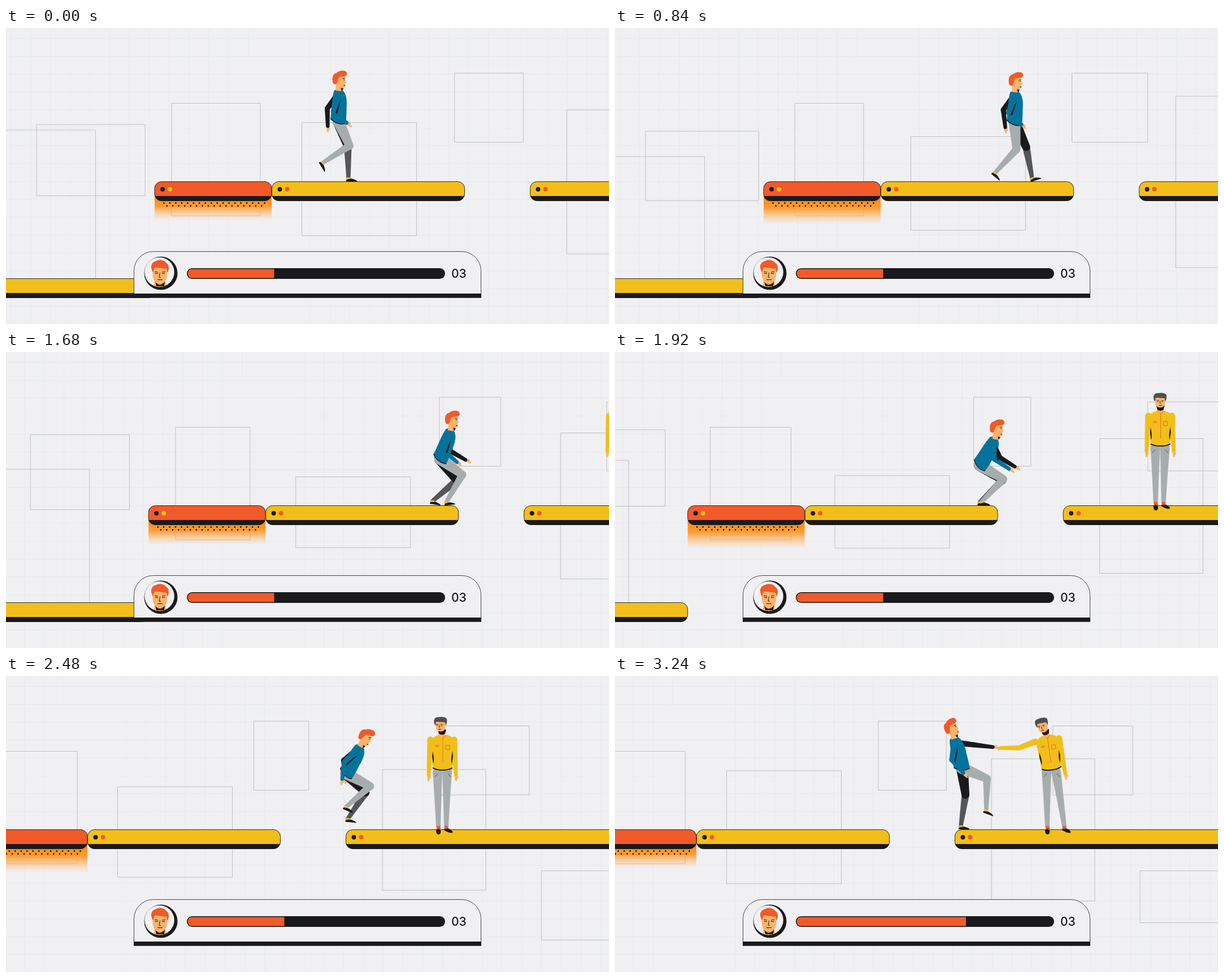
Animation, 1067 px wide and 525 px high, one loop 3280 ms. Source, as an HTML page with a canvas:

```html
<!DOCTYPE html>
<html lang="en">
<head>
<meta charset="utf-8">
<title>Platform walk</title>
<style>
html, body { margin: 0; width: 100%; height: 100%; overflow: hidden; background: #f0f0f2; }
canvas { display: block; }
</style>
</head>
<body>
<canvas id="stage" width="1067" height="525"></canvas>
<script>
const ctx = document.getElementById('stage').getContext('2d');
const LOOP = 3280, STEP = 520, STRIDE = 132;
const BG = '#f0f0f2', INK = '#1a1a1c', RED = '#f15a29', YELLOW = '#f2be1a', BLUE = '#04739c';
const GREY = '#a7adad', DARK = '#555658', SKIN = '#fbb36b', HAIR = '#4d4f50';

// Timing
const part = (t, a, b) => Math.min(1, Math.max(0, (t - a) / (b - a)));
const ramp = (t, a, b) => {
  const u = part(t, a, b);
  return u * u * (3 - 2 * u);
};
const mix = (a, b, u) => a + (b - a) * u;
const wave = (t, mid, size, peak, period = LOOP) =>
  mid + size * Math.cos((t - peak) * 2 * Math.PI / period);

// Drawing
function fill(d, color) {
  ctx.fillStyle = color;
  ctx.fill(new Path2D(d));
}
function line(d, color, width) {
  ctx.strokeStyle = color;
  ctx.lineWidth = width;
  ctx.stroke(new Path2D(d));
}
function outline(color, width) {
  ctx.strokeStyle = color;
  ctx.lineWidth = width;
  ctx.stroke();
}
function disc(x, y, r, color) {
  ctx.beginPath();
  ctx.arc(x, y, r, 0, 7);
  ctx.fillStyle = color;
  ctx.fill();
}
function box(x, y, w, h, r, color) {
  ctx.beginPath();
  ctx.roundRect(x, y, w, h, r);
  ctx.fillStyle = color;
  ctx.fill();
}
function at([x, y], angle, draw) {
  ctx.save();
  ctx.translate(x, y);
  ctx.rotate(angle);
  draw();
  ctx.restore();
}
const offset = ([x, y], dx, dy, angle = 0) => {
  const c = Math.cos(angle), s = Math.sin(angle);
  return [x + dx * c - dy * s, y + dx * s + dy * c];
};
const heading = (a, b) => Math.atan2(b[1] - a[1], b[0] - a[0]);

function taper(a, b, ra, rb, color) {
  const dir = heading(a, b), q = Math.PI / 2;
  ctx.beginPath();
  ctx.arc(a[0], a[1], ra, dir + q, dir + 3 * q);
  ctx.arc(b[0], b[1], rb, dir - q, dir + q);
  ctx.fillStyle = color;
  ctx.fill();
}
// Middle joint of a two-part limb
function bend(a, b, upper, lower, side) {
  const d = Math.hypot(b[0] - a[0], b[1] - a[1]);
  const along = (upper * upper - lower * lower + d * d) / (2 * d);
  const out = Math.sqrt(Math.max(0, upper * upper - along * along));
  return offset(a, along, -side * out, heading(a, b));
}
function arm(shoulder, reach, side, r, color) {
  const wrist = offset(shoulder, ...reach), elbow = bend(shoulder, wrist, 31, 31, side);
  const dir = heading(elbow, wrist);
  taper(wrist, offset(wrist, 10, 0, dir), 3, 1.5, SKIN);
  taper(wrist, offset(wrist, 6, -3, dir), 2, 1.2, SKIN);
  taper(shoulder, elbow, r, r - 1, color);
  taper(elbow, wrist, r - 1, r - 2.2, color);
  return elbow;
}
function leg(hip, [x, y, turn], thigh, shin) {
  const ankle = [x, y], knee = bend(hip, ankle, 48, 56, 1);
  taper(knee, ankle, 6.8, 3.6, shin);
  taper(hip, knee, 10.5, 7, thigh);
  at(ankle, turn, () => {
    fill('M-3 -1H3L5 4H-3Z', YELLOW);
    fill('M-4 3L0 2L5 1C9 2 13 3 15 5V6H-4Z', INK);
  });
}

// Walker poses. hip: x, y, lean, head tilt; feet: x, y, shoe angle; hands: from the shoulder
const CROUCH = {
  hip: [780, 201, .52, .05], near: [783, 266, 0], far: [780, 266, 0], nearHand: [30, 48], farHand: [40, 44]
};
const AIR = {
  hip: [928, 173, .48, .45], near: [928, 232, .4], far: [931, 253, .1], nearHand: [-27, 52], farHand: [-22, 50]
};
const LAND = { ...AIR, hip: [934, 188, .4, .4], near: [945, 266, 0], far: [938, 266, 0] };
const CATCH = {
  hip: [940, 163, -.25, -.35], near: [983, 238, .35], far: [938, 266, 0], nearHand: [16, 54], farHand: [68, 8]
};

function footstep(t) {
  const cycle = (t - STEP / 2) / (2 * STEP), n = Math.floor(cycle);
  const u = Math.min(1, (cycle - n) * 1.9);
  const relax = 1 - ramp(cycle - n, .54, .62);
  return [
    606 + STRIDE * (n + u ** 2.5),
    266 - 27 * Math.sin(Math.PI * u),
    1.7 * (1 - .75 * u) * Math.sin(1.3 * Math.PI * u) * relax
  ];
}
function walk(t) {
  const swing = wave(t, 0, 19, -80, 2 * STEP);
  const [x, y, turn] = footstep(t - STEP);
  return {
    hip: [588 + .1415 * t, wave(t, 166.5, -1.5, 0, STEP), .02, 0],
    near: [x + STRIDE / 2, y, turn],
    far: footstep(t),
    nearHand: [swing - 1, 53 - swing / 6],
    farHand: [-swing - 1, 53 + swing / 6]
  };
}
function blend(a, b, u) {
  const pose = {};
  for (const key in a) pose[key] = a[key].map((v, i) => mix(v, b[key][i], u));
  return pose;
}
function poseAt(t) {
  let pose = walk(Math.min(t, 1340));
  pose = blend(pose, CROUCH, ramp(t, 1340, 1900));
  pose = blend(pose, AIR, part(t, 2040, 2480));
  pose = blend(pose, LAND, ramp(t, 2480, 2600));
  pose = blend(pose, CATCH, ramp(t, 2620, 3000));
  const hop = 64 * Math.sin(Math.PI * part(t, 2040, 2480));
  for (const key of ['hip', 'near', 'far']) pose[key][1] -= hop;
  return pose;
}

function walker(t) {
  const { hip: [x, y, lean, tilt], near, far, nearHand, farHand } = poseAt(t);
  const hip = [x, y], shoulder = offset(hip, -2, -47, lean);
  arm(shoulder, farHand, -1, 5.5, INK);
  leg(hip, far, INK, DARK);
  leg(hip, near, GREY, GREY);
  at(hip, lean, () => {
    fill('M-14 -4C-12 -22 -12 -42 -9 -53C-5 -58 3 -58 7 -54C13 -48 15 -38 14 -24C14 -12 14 -4 13 4C4 7 -6 4 -14 -4Z', BLUE);
    line('M-14 -4C-6 4 4 7 13 4', INK, 1.5);
  });
  at(offset(hip, 0, -57, lean), tilt, () => {
    fill('M-4 -23H11V-15L13 -12L11 -10V-4C8 -1 5 -1 3 -2L5 4L-6 3L-5 -10Z', SKIN);
    fill('M3 -2L8 -1L5 4Z', INK);
    fill('M-10 -9C-13 -17 -12 -27 -5 -28C0 -33 10 -34 13 -30C16 -25 12 -22 7 -22C3 -21 0 -22 -1 -19L-3 -13L-5 -8Z', RED);
    line('M6 -18L10 -19M8 -16H10M8 -6H11', INK, 1);
  });
  const elbow = arm(shoulder, nearHand, -1, 5.5, BLUE);
  const dir = heading(shoulder, elbow);
  taper(offset(shoulder, 10, -7, dir), offset(shoulder, 32, -6, dir), .5, 1.7, INK);
}

function helper(t) {
  const reach = ramp(t, 2560, 2900), turn = ramp(t, 2040, 2300);
  const waist = [1099 - turn, 164], lean = -.14 * reach;
  const left = [1091, 266], right = [mix(1105, 1121, reach), 266];
  for (const [side, ankle] of [[-8.5, left], [8.5, right]]) {
    const hip = offset(waist, side, 6), knee = [mix(hip[0], ankle[0], .45), 212];
    taper(hip, knee, 8.5, 6.3, GREY);
    taper(knee, ankle, 6.3, 4, GREY);
    at(ankle, 0, () => fill('M-3 0H3L5 7H-3Z', RED));
  }
  at(left, 0, () => fill('M-4 7L0 5L4 7C5 12 3 15 1 15C-3 15 -4 12 -4 7Z', INK));
  at(right, 0, () => fill('M-4 5C0 6 4 4 7 6C10 8 12 10 11 12C6 13 0 10 -4 7Z', INK));
  line('M1085 179l5 -6M1113 179l-5 -6', DARK, 1);

  arm(offset(waist, 21, -51, lean), [mix(3, 11, reach), 62], -1, 5.5, YELLOW);
  at(waist, lean, () => {
    fill('M-17 -1L-20 -50C-16 -56 -9 -59 -5 -60H6C12 -59 18 -56 21 -51L18 -1C10 4 -8 4 -17 -1Z', YELLOW);
    fill('M-17 -31C-15 -20 -14 -14 -16 -8L-18 -22ZM18 -31C16 -20 15 -14 17 -8L19 -22Z', INK);
    line('M-17 -1C-8 4 10 4 18 -1', INK, 2);
    line('M1 -57V-10M6 -41h7v7l-3.5 1l-3.5 -1ZM-12 -41h6v2h-6ZM-4 -59L1 -54L6 -59', RED, .8);
  });
  arm(offset(waist, -21, -51, lean), [mix(-3, -60, reach), mix(62, 11, reach)], 1, 5.5, YELLOW);

  at(offset(waist, -turn, -59, lean), -.25 * reach, () => {
    fill('M-5 -12H6V0L1 4L-5 0Z', SKIN);
    fill('M-7 -10H8L6 -3C3 0 -2 0 -5 -3Z', INK);
    ctx.translate(-2 * turn, 0);
    fill('M-9 -25H9L8 -11C5 -5 -5 -5 -8 -11Z', SKIN);
    fill('M-11 -20C-13 -28 -10 -32 -5 -32C0 -33 9 -33 11 -29C12 -25 11 -20 9 -17L8 -23L-8 -24L-9 -17Z', HAIR);
    ctx.translate(-2 * turn, 0);
    line('M-6 -19H-2M2 -19H6M-5 -17H-3M3 -17H5M0 -18V-13M-2 -10.5H3', INK, .9);
  });
}

// Scenery
function grid() {
  ctx.beginPath();
  for (let x = 8.5; x < 1400; x += x === 428.5 ? 110 : 35) {
    ctx.moveTo(x, 0);
    ctx.lineTo(x, x === 428.5 ? 52 : 525);
  }
  for (let y = 18; y < 525; y += 31.7) {
    ctx.moveTo(0, Math.round(y) + .5);
    ctx.lineTo(1400, Math.round(y) + .5);
  }
  outline('rgba(165,200,205,.13)', 1);
}

// Each outline breathes along one edge; its other edges follow.
function frames(t) {
  const frame = (l, top, r, b) => ctx.rect(l, top, r - l, b - top);
  ctx.beginPath();
  let v = wave(t, 195.7, 35, 1046);
  frame(-60, v, 158.5, 470);
  v = wave(t, 159.8, 26.2, 589);
  frame(54, v, 128 + .69 * v, 172.7 + .73 * v);
  v = wave(t, 302.5, 17.9, 1114);
  frame(v, 133.5, 567 - .4 * v, 333);
  v = wave(t, 194.5, 27, 1700);
  frame(523.5, v, 726.5, 435.5 - .4 * v);
  v = wave(t, 786.5, 23.5, 660);
  frame(v, 80, 1.83 * v - 537, 202.5);
  v = wave(t, 143.5, -22.5, 860);
  frame(992, v, 1175, 546 - v);
  v = wave(t, 1087, 14, 3150);
  frame(v, 88.5, 2343 - v, 211);
  v = wave(t, 1263, 14, 2100);
  frame(v, 345.5, 1440, 1.66 * v - 1645.7);
  outline('#bfc0c6', 1);
}

function platform(x, y, right, color, dot) {
  const w = right - x;
  ctx.save();
  box(x, y, w, 34, 12, color);
  ctx.clip();
  ctx.fillStyle = INK;
  ctx.fillRect(x, y + 25.5, w, 10);
  ctx.restore();
  outline(INK, .9);
  disc(x + 14, y + 13.5, 4, INK);
  disc(x + 27, y + 13.5, 4, dot);
}

function heat(t) {
  const end = wave(t, 345, 8, 550, LOOP / 2), g = ctx.createLinearGradient(0, 300, 0, end);
  g.addColorStop(0, '#ff8408');
  g.addColorStop(.4, 'rgba(255,150,40,.92)');
  g.addColorStop(1, 'rgba(255,190,120,0)');
  ctx.fillStyle = g;
  ctx.fillRect(263, 298, 207, end - 298);
  for (let i = 0; i < 35; i++) disc(279.5 + i * 5.235, i % 2 ? 315.5 : 310.5, 1.4, INK);
}

function panel(t) {
  box(226.5, 396.5, 614, 81.5, [34, 34, 0, 0], BG);
  outline(INK, .8);
  ctx.fillStyle = INK;
  ctx.fillRect(226, 471, 615, 7.5);

  disc(274, 435, 29.5, INK);
  ctx.save();
  disc(271.5, 433, 26.3, BG);
  ctx.clip();
  fill('M263 446H282L284 462H261Z', SKIN);
  fill('M264 449C269 457 276 457 281 449L280 458H266Z', INK);
  fill('M259 424H286L285 441C284 448 277 455 272 455C267 455 261 448 260 441Z', SKIN);
  fill('M257 426C256 417 262 414 266 413C272 410 281 412 284 417C289 420 289 428 286 434L284 427C276 427 268 424 263 425L260 434Z', RED);
  line('M263 432.5L269 433M276 433L282 432.5M264 435.5H269M276 435.5H281M272.5 434L271 442H274M268 446.5H277', INK, 1);
  ctx.restore();

  box(320, 426, 457, 19, 9.5, INK);
  box(321.5, 427.5, 153 + 146.5 * ramp(t, 2280, 3200), 16, [8, 0, 0, 8], RED);
  ctx.fillStyle = INK;
  ctx.font = '500 21px Inter, sans-serif';
  ctx.fillText('03', 788, 443.2);
}

function draw(now) {
  const t = now % LOOP;
  ctx.fillStyle = BG;
  ctx.fillRect(0, 0, 1067, 525);
  ctx.save();
  ctx.translate(-326 * ramp(t, 1602, 2325), 0);
  grid();
  frames(t);
  heat(t);
  platform(-80, 444.5, 263, YELLOW, RED);
  platform(263, 272.5, 470, RED, YELLOW);
  platform(470.5, 272.5, 811.5, YELLOW, RED);
  platform(927.5, 272.5, 1480, YELLOW, RED);
  helper(t);
  walker(t);
  ctx.restore();
  panel(t);
  requestAnimationFrame(draw);
}
requestAnimationFrame(draw);
</script>
</body>
</html>
```
